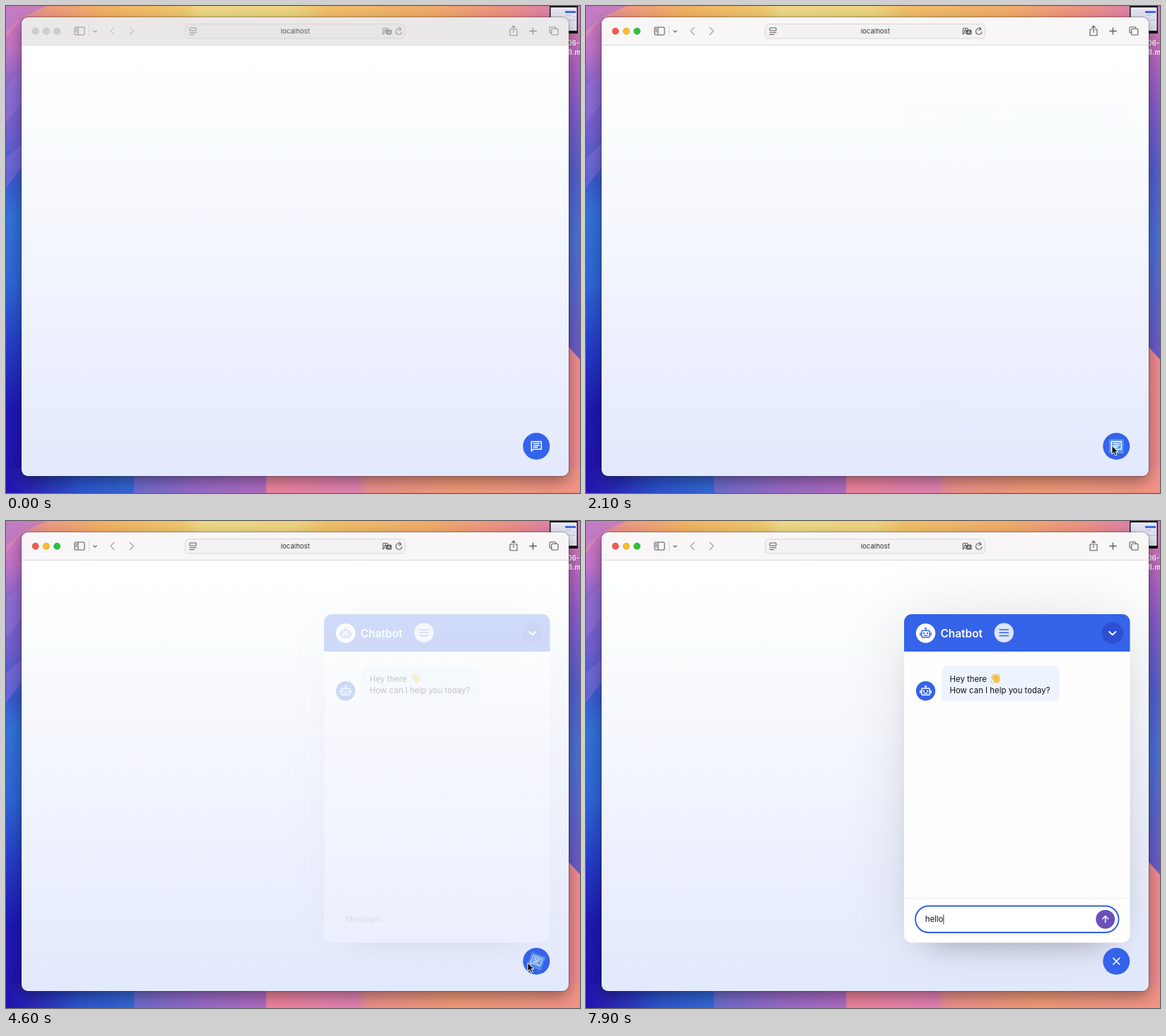
Recreate the animation shown at these times as an HTML page. Size 812 px wide and 690 px high, loop 8000 ms.

```html
<!DOCTYPE html>
<html lang="en">
<head>
<meta charset="utf-8">
<title>Chatbot widget</title>
<style>
html, body { margin: 0; width: 812px; height: 690px; overflow: hidden; }
svg { display: block; font-family: Inter, "Open Sans", sans-serif; }
.line { fill: none; stroke-linecap: round; stroke-linejoin: round; }
#bar { --ink: #5c5a5b; --dim: #aaa8a9; --bar: #f8f6f7; --field: #f3f1f2; --label: #343233; }
#bar.idle { --ink: #99979a; --dim: #c8c5c7; --bar: #ebe8e9; --field: #e8e5e6; --label: #5a5859; }
#bar .line { stroke: var(--ink); stroke-width: 1.1; }
#bar .dim { stroke: var(--dim); }
#bar.idle .light { fill: #cfcccd; stroke: #bbb8b9; }
</style>
</head>
<body>
<svg width="812" height="690" viewBox="0 0 812 690">
<defs>
  <linearGradient id="leftSky" x2="0" y2="1">
    <stop stop-color="#cf78bd"/><stop offset=".09" stop-color="#c374c8"/>
    <stop offset=".17" stop-color="#8064cf"/><stop offset=".26" stop-color="#7360cf"/>
    <stop offset=".36" stop-color="#395bd1"/><stop offset=".43" stop-color="#3472d9"/>
    <stop offset=".57" stop-color="#2f66d8"/><stop offset=".72" stop-color="#2437c7"/>
    <stop offset=".83" stop-color="#1e18b4"/><stop offset="1" stop-color="#2312b0"/>
  </linearGradient>
  <linearGradient id="rightSky" x2="0" y2="1">
    <stop stop-color="#e286ab"/><stop offset=".11" stop-color="#b866c4"/>
    <stop offset=".2" stop-color="#8a5fce"/><stop offset=".34" stop-color="#5560cf"/>
    <stop offset=".48" stop-color="#4c72d6"/><stop offset=".7" stop-color="#6b5ccb"/>
  </linearGradient>
  <linearGradient id="topSky">
    <stop stop-color="#d484bd"/><stop offset=".07" stop-color="#ee9a83"/>
    <stop offset=".17" stop-color="#f4b264"/><stop offset=".31" stop-color="#f0c970"/>
    <stop offset=".34" stop-color="#f0d988"/><stop offset=".5" stop-color="#efd580"/>
    <stop offset=".56" stop-color="#f2c06a"/><stop offset=".74" stop-color="#f3ad6b"/>
    <stop offset=".88" stop-color="#ee9089"/><stop offset="1" stop-color="#d27ac0"/>
  </linearGradient>
  <linearGradient id="bottomSky">
    <stop stop-color="#2312b0"/><stop offset=".05" stop-color="#2a2ab9"/>
    <stop offset=".13" stop-color="#2d55d0"/><stop offset=".222" stop-color="#3568d6"/>
    <stop offset=".224" stop-color="#6e6bce"/><stop offset=".34" stop-color="#9a6bc8"/>
    <stop offset=".452" stop-color="#b06cc4"/><stop offset=".455" stop-color="#f0849c"/>
    <stop offset=".61" stop-color="#e282b4"/><stop offset=".63" stop-color="#ee8f8c"/>
    <stop offset=".78" stop-color="#f39a78"/><stop offset="1" stop-color="#f29388"/>
  </linearGradient>
  <linearGradient id="page" x2="0" y2="1">
    <stop stop-color="#fff"/><stop offset=".2" stop-color="#fafdfd"/>
    <stop offset=".42" stop-color="#f5f7fe"/><stop offset="1" stop-color="#e3e9fd"/>
  </linearGradient>
  <clipPath id="pane"><rect x="22" y="16" width="774" height="650" rx="9"/></clipPath>
  <clipPath id="card"><rect x="450" y="132" width="319.5" height="465.5" rx="11"/></clipPath>
  <filter id="soft" x="-1" y="-1" width="3" height="3"><feGaussianBlur stdDeviation="11"/></filter>
  <filter id="wide" filterUnits="userSpaceOnUse" x="250" y="-60" width="720" height="850"><feGaussianBlur stdDeviation="48"/></filter>
  <filter id="drop" filterUnits="userSpaceOnUse" x="380" y="80" width="460" height="650"><feGaussianBlur stdDeviation="24"/></filter>
  <filter id="small" x="-.3" y="-.3" width="1.6" height="1.6"><feGaussianBlur stdDeviation="3.5"/></filter>
  <g id="robot" class="line" stroke="currentColor">
    <rect x="-5.7" y="-3.8" width="11.4" height="9.6" rx="1.8" stroke-width="1.5"/>
    <path d="M0-4V-7M-1-7H1M-7.6-.2V2.8M7.6-.2V2.8M-2.2 3.3H2.2" stroke-width="1.5"/>
    <path d="M-2.6-.1V.2M2.6-.1V.2" stroke-width="2.3"/>
  </g>
</defs>

<!-- desktop -->
<rect width="812" height="690" fill="url(#leftSky)"/>
<path d="M0 112L22 92V138L0 165ZM0 215L22 196V228L0 258Z" fill="#a57bdd" opacity=".35"/>
<rect x="406" width="406" height="690" fill="url(#rightSky)"/>
<path d="M796 483L812 501V690H796Z" fill="#f28c93"/>
<rect y="655" width="812" height="35" fill="url(#bottomSky)"/>
<path d="M0 0H812V22L740 16H22L0 46Z" fill="url(#topSky)"/>
<path d="M0 0H58L22 16L0 36Z" fill="#b975cf" opacity=".65"/>
<g>
  <rect x="769" y="0" width="40" height="39" fill="#17151c"/>
  <rect x="770.5" y="2" width="37" height="33" fill="#e6e6f3"/>
  <path d="M791 7H806V10H791Z" fill="#4169e3"/>
  <path d="M792 13H800M803 15H806M791 20H806" stroke="#b6bfe6"/>
  <g fill="#fff" font-size="9.8" font-weight="600">
    <text x="794" y="56">06-1</text><text x="795" y="68.5">8.mp4</text>
  </g>
</g>

<!-- browser window -->
<rect x="22" y="23" width="774" height="650" rx="9" opacity=".4" filter="url(#soft)"/>
<rect x="21.5" y="15.5" width="775" height="651" rx="9.5" fill="none" stroke="#000" stroke-opacity=".25"/>
<g clip-path="url(#pane)">
  <rect x="22" y="56" width="774" height="610" fill="url(#page)"/>
  <g id="bar">
    <rect x="22" y="16" width="774" height="40" fill="var(--bar)"/>
    <path d="M22 55.5H796" stroke="#dddadb"/>
    <g stroke-width=".6">
      <circle class="light" cx="41.7" cy="35.7" r="4.6" fill="#ee5b52" stroke="#d64b43"/>
      <circle class="light" cx="57" cy="35.7" r="4.6" fill="#f5bd2f" stroke="#dda321"/>
      <circle class="light" cx="72.2" cy="35.7" r="4.6" fill="#2cc140" stroke="#20a732"/>
    </g>
    <path class="line" d="M98.5 30H109.5Q111 30 111 31.5V39.5Q111 41 109.5 41H98.5Q97 41 97 39.5V31.5Q97 30 98.5 30ZM102 30V41M98.7 32.5H100.3M98.7 34.5H100.3M98.7 36.5H100.3"/>
    <path d="M117.5 28V43" stroke="#dbd8d9"/>
    <path class="line" d="M123.7 34.8L126 37L128.3 34.8"/>
    <path class="line dim" style="stroke-width:1.4" d="M153 30.5L148 35.5L153 40.5M175.3 30.5L180.3 35.5L175.3 40.5"/>
    <rect x="253.5" y="25.5" width="311" height="20.5" rx="5" fill="var(--field)" stroke="#d9d6d7"/>
    <path class="line" d="M261 31H268Q269 31 269 32V34Q269 35 268 35H261Q260 35 260 34V32Q260 31 261 31ZM260 37.7H269M260 40.5H266"/>
    <text x="409.3" y="39.3" text-anchor="middle" font-size="9.6" fill="var(--label)">localhost</text>
    <rect x="538" y="33.5" width="7.5" height="7" rx="1.5" fill="var(--ink)"/>
    <path class="line" d="M534 31.5H539Q540.5 31.5 540.5 33M538 38.3H535L533.3 40V33Q533.3 31.5 534 31.5M535 36.8L536.7 33L538 36.5"/>
    <path d="M540 39L541.8 35L543.6 39M540.7 37.7H543" fill="none" stroke="var(--field)" stroke-width=".8"/>
    <path class="line" d="M559 33.2A4.3 4.3 0 1 0 560 36.5M556.7 30.2L559 33.2L555.7 34.5"/>
    <path class="line" d="M716 33H713V41.7H723V33H720M718 37.5V28.3M715.5 30.6L718 28.2L720.5 30.6"/>
    <path class="line" style="stroke-width:1.3" d="M740.8 35.5H750.3M745.5 30.8V40.2"/>
    <path class="line" d="M771.5 38H770Q769 38 769 37V31Q769 29.7 770.3 29.7H776.5Q777.7 29.7 777.7 31V32M773 32.3H779.7Q781 32.3 781 33.6V39.7Q781 41 779.7 41H773Q771.7 41 771.7 39.7V33.6Q771.7 32.3 773 32.3Z"/>
  </g>

  <!-- chat panel -->
  <g id="panel">
    <g clip-path="url(#below)">
      <rect x="450" y="132" width="319.5" height="465.5" rx="11" opacity=".1" filter="url(#wide)"/>
      <rect x="486" y="192" width="247" height="393" opacity=".5" filter="url(#drop)"/>
    </g>
    <g clip-path="url(#card)">
      <rect x="450" y="132" width="320" height="466" fill="#fefefe"/>
      <rect x="450" y="132" width="320" height="53" fill="#3563e9"/>
      <path d="M450 534.5H770" stroke="#efeff3"/>
    </g>
    <circle cx="480.5" cy="159" r="13.7" fill="#fff"/>
    <use href="#robot" x="480.5" y="159" color="#3563e9"/>
    <text x="501.5" y="164.6" font-size="15.4" font-weight="600" fill="#fff">Chatbot</text>
    <circle id="menu" cx="591.3" cy="158.2" r="13.7" fill="#fff"/>
    <path class="line" d="M585 154H597.5M585 158.2H597.5M585 162.4H597.5" stroke="#3563e9" stroke-width="1.5"/>
    <circle cx="744.8" cy="158.8" r="15.2" fill="#2e4fd3"/>
    <path class="line" d="M740.3 157L744.8 161.3L749.3 157" stroke="#fff" stroke-width="2"/>
    <circle cx="480.5" cy="240.8" r="13.7" fill="#3563e9"/>
    <use href="#robot" x="480.5" y="240.8" color="#fff"/>
    <path d="M512 205H661Q670 205 670 214V247Q670 256 661 256H505Q503 256 503 254V214Q503 205 512 205Z" fill="#eef4fe"/>
    <g font-size="11.4" fill="#111">
      <text x="514.5" y="228">Hey there</text>
      <text x="514.5" y="244.2">How can I help you today?</text>
    </g>
    <g class="line" stroke="#f4c351">
      <path d="M573.8 221.5L579 227M575.5 218.8L581 225M578.3 217.8L582.5 223.5M581 218.8L584 224" stroke-width="2.3"/>
      <path d="M584.2 220.5Q583.6 223 584.6 226" stroke-width="2.2"/>
      <ellipse cx="580.8" cy="226" rx="3.6" ry="3.3" fill="#f4c351"/>
      <path d="M575.6 220.8L579.2 225M578 219.3L581 223.5" stroke="#d99a34" stroke-width=".6"/>
      <path d="M572.2 226Q573 229 576 230M581.5 216.5Q585 217 585.7 219.5" stroke="#a9b5c4" stroke-width=".9"/>
    </g>
    <rect id="field" x="466" y="545.5" width="287.5" height="37.5" rx="18.7" fill="#fff"/>
    <text id="entry" x="479.7" y="568.3" font-size="11.4"></text>
    <path id="caret" d="M0 557.5V571.5" stroke="#2f5fe0" stroke-width="1.2"/>
    <g id="send">
      <circle cx="734.7" cy="564.3" r="13.4" fill="#6c4fbd"/>
      <path class="line" d="M734.7 568.8V560M730.7 563.8L734.7 559.8L738.7 563.8" stroke="#fff" stroke-width="1.5"/>
    </g>
    <g id="list">
      <rect x="577" y="183" width="105" height="58" rx="5" opacity=".16" filter="url(#small)"/>
      <path d="M581 180H584L588.5 175.7L593 180H678Q683 180 683 185V235Q683 240 678 240H581Q576 240 576 235V185Q576 180 581 180Z" fill="#fff" fill-opacity=".97"/>
      <rect x="592" y="192.6" width="11" height="11" rx="2" fill="#fff" stroke="#3563e9" stroke-width="1.5"/>
      <rect x="591.3" y="216" width="12.4" height="12.4" rx="2.4" fill="#3563e9"/>
      <path class="line" d="M594.4 222.4L596.7 224.7L600.7 219.6" stroke="#fff" stroke-width="1.6"/>
      <g font-size="10.3" font-weight="600" fill="#4b4f5c">
        <text x="609" y="201.8">CalmPond</text><text x="609" y="226">Sumeli</text>
      </g>
    </g>
  </g>

  <!-- toggle button -->
  <circle cx="750.3" cy="623.8" r="19" fill="#3563e9"/>
  <g id="spin" class="line" stroke="#fff">
    <g id="bubble">
      <rect class="mark" x="-10.3" y="-10" width="20.6" height="20" fill="#5b96ec" stroke="none"/>
      <path d="M-7-6.5H7V4.3H-4.5L-7 6.8ZM-4-3.7H4M-4-1.1H4M-4 1.5H1.5" stroke-width="1.5"/>
    </g>
    <g id="cross">
      <rect class="mark" x="-10.3" y="-10.3" width="20.6" height="20.6" fill="#5b96ec" stroke="none"/>
      <path d="M-4.4-4.4L4.4 4.4M-4.4 4.4L4.4-4.4" stroke-width="1.6"/>
    </g>
  </g>
</g>

<g id="pointer">
  <path id="arrow" d="M0 0V12L2.8 9.4L4.8 14L7 13L5 8.6H8.8Z" stroke="#fff" stroke-width="1" stroke-linejoin="round"/>
  <path id="beam" class="line" d="M-2-6Q0-6 0-4V4Q0 6 2 6M2-6Q0-6 0-4M0 4Q0 6-2 6" stroke="#222"/>
</g>
</svg>
<script>
const LOOP = 8000;
const el = id => document.getElementById(id);
const set = (id, attrs) => {
  for (const key in attrs) el(id).setAttribute(key, attrs[key]);
};
const show = (id, on) => set(id, { visibility: on ? 'visible' : 'hidden' });
const ease = x => {
  x = Math.max(0, Math.min(1, x));
  return x * x * (3 - 2 * x);
};
// 0..1 visibility for a list of [start, end] openings
const fade = (t, spans, length) => spans.reduce(
  (sum, [a, b]) => sum + ease((t - a) / length) - ease((t - b) / length), 0);

const panelSpans = [[1365, 1910], [2450, 3850], [4540, 9000]];
const listSpans = [[3120, 3690], [5330, 6850]];
const keyTimes = [7200, 7340, 7470, 7600, 7740];
const focusTime = 6850;

// time, x, y of the pointer
const route = [
  [100, 815, 692], [750, 744, 619], [1550, 744, 619], [1850, 744, 623],
  [2550, 744, 623], [3050, 592, 158], [3200, 592, 158], [3620, 741, 161],
  [3950, 741, 161], [4450, 738, 626], [4700, 738, 626], [5200, 591, 158],
  [5450, 591, 158], [5750, 603, 213], [5900, 603, 213], [6350, 612, 314],
  [6750, 560, 564], [7200, 560, 564]
];

function movePointer(t) {
  const next = route.findIndex(stop => stop[0] > t);
  show('pointer', next > 0);
  show('arrow', false);
  show('beam', false);
  if (next < 1) return;
  const [t0, x0, y0] = route[next - 1], [t1, x1, y1] = route[next];
  const k = ease((t - t0) / (t1 - t0));
  const x = x0 + (x1 - x0) * k, y = y0 + (y1 - y0) * k;
  set('pointer', { transform: `translate(${x} ${y})` });
  const overField = y > 546 && y < 583 && x < 720 && t > 6000;
  show(overField ? 'beam' : 'arrow', true);
}

function typeMessage(t) {
  const focused = t >= focusTime;
  const text = 'hello'.slice(0, keyTimes.filter(k => t >= k).length);
  const entry = el('entry');
  entry.textContent = text || 'Message...';
  set('entry', { fill: text ? '#111' : '#a2a2a7' });
  set('field', { stroke: focused ? '#2f5fe0' : '#e1e2ea', 'stroke-width': focused ? 1.9 : 1 });
  const x = 479.7 + (text ? entry.getComputedTextLength() + 0.4 : 0);
  set('caret', { transform: `translate(${x} 0)` });
  show('caret', focused);
  show('send', text);
}

function draw(t) {
  el('bar').classList.toggle('idle', t < 900);

  const open = fade(t, panelSpans, 200);
  set('panel', { opacity: open });
  set('spin', { transform: `translate(750.3 623.8) rotate(${open * 90})` });
  set('bubble', { opacity: 1 - open });
  set('cross', { opacity: open });
  const marked = t > 1365 && t < 5330;
  document.querySelectorAll('.mark').forEach(m => m.setAttribute('opacity', marked ? 1 : 0));

  const list = fade(t, listSpans, 150);
  set('list', { opacity: list, transform: `translate(0 ${(list - 1) * 7})` });
  set('menu', { 'fill-opacity': 0.83 + 0.17 * list });

  typeMessage(t);
  movePointer(t);
}

const start = performance.now();
function frame() {
  draw((performance.now() - start) % LOOP);
  requestAnimationFrame(frame);
}
frame();
</script>
</body>
</html>
```
